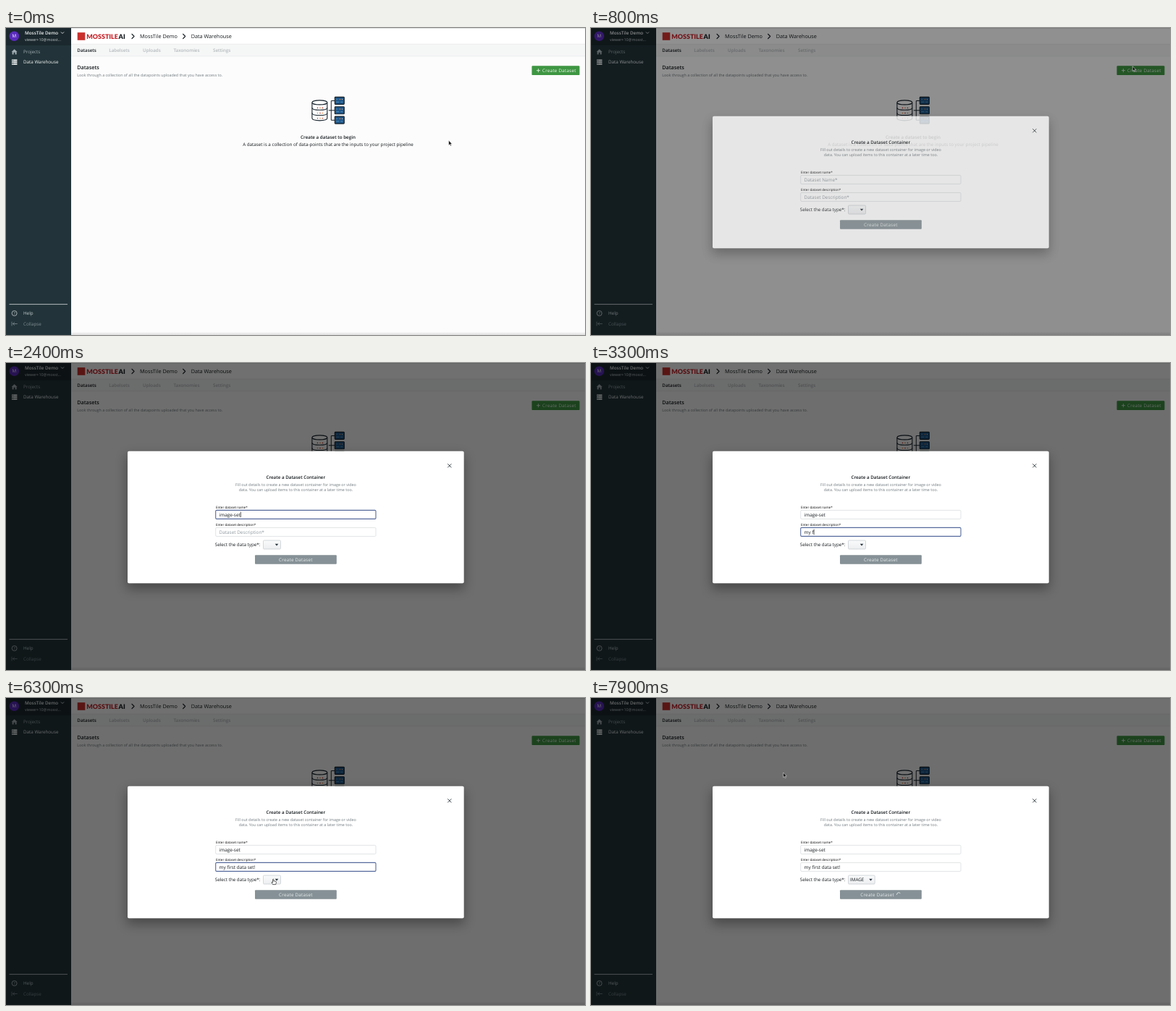
Write an HTML page that moves like this. It is 800 px wide and 424 px high and loops after 8000 ms.

```html
<!DOCTYPE html>
<html lang="en">
<head>
<meta charset="utf-8">
<title>Create a dataset</title>
<style>
  html, body { margin: 0; width: 100%; height: 100%; overflow: hidden; background: #fcfcfc; }
  svg { display: block; width: 800px; height: 424px; font-family: "Open Sans", "Noto Sans", sans-serif; }
  text { font-size: 6.27px; fill: #14191c; text-rendering: geometricPrecision; white-space: pre; }
  .semi { font-weight: 600; }
  .mid { text-anchor: middle; }
  .big { font-size: 7.25px; }
  .small { font-size: 5.38px; }
  .tiny { font-size: 4.5px; fill: #000; }
  .field { font-size: 6.4px; }
  .btn { letter-spacing: .25px; }
  .gray { fill: #70797e; }
  .tab { font-weight: 600; fill: #b4b9bc; }
  .hint { fill: #8f989e; }
  .line { fill: none; stroke-linecap: round; stroke-linejoin: round; }
  .box { fill: #fff; stroke: #d5d9dc; stroke-width: .7; }
  .box.on { stroke: #566a9c; stroke-width: 1.1; }
</style>
</head>
<body>
<svg viewBox="0 0 800 424">
  <defs>
    <linearGradient id="edge" x2="0" y2="1">
      <stop stop-color="#fcfcfc"/><stop offset="1" stop-color="#dcdcdc"/>
    </linearGradient>
    <linearGradient id="face" x2="0" y2="1">
      <stop stop-color="#fafbfb"/><stop offset="1" stop-color="#eceef0"/>
    </linearGradient>
    <filter id="soft" x="-20%" y="-30%" width="140%" height="170%"><feGaussianBlur stdDeviation="8"/></filter>
    <g id="server">
      <rect width="13" height="10" rx=".8" fill="#1f5688" stroke="#16222b" stroke-width="1.1"/>
      <path d="M2 3.2h2M2 6.8h4M8 6.8h3" stroke="#5fa0cb" stroke-width=".8"/>
      <path d="M6 3.2h2.5" stroke="#e9873c" stroke-width=".8"/>
      <circle cx="10.3" cy="3.2" r=".6" fill="#d8eaf4"/>
    </g>
    <g id="arrow"><path d="M0 0V6.6L1.5 5.3L2.5 7.6L3.6 7.1L2.6 4.9H4.6Z" fill="#0b0b0b" stroke="#fff" stroke-width=".5"/></g>
    <g id="hand"><path d="M-.7 .5Q0 -.4 .6 .5V3L1.6 2.8L2.6 3.1L3.8 3.5Q4.3 4 4 5.4L3.4 7.6H-.6L-2.3 4.8Q-2.2 3.8 -1.4 4.3L-.7 5Z" fill="#fff" stroke="#111" stroke-width=".65"/></g>
    <g id="beam"><path class="line" d="M-1.2 -3.5Q0 -3.5 0 -2.6V2.6Q0 3.5 -1.2 3.5M1.2 -3.5Q0 -3.5 0 -2.6M0 2.6Q0 3.5 1.2 3.5" stroke="#222" stroke-width=".6"/></g>
  </defs>

  <!-- page -->
  <rect width="800" height="424" fill="#fcfcfc"/>
  <rect x="90" width="710" height="22" fill="#fff"/>
  <rect x="90" width="710" height=".8" fill="#d6d8d9"/>
  <rect x="90" y="22" width="710" height="17" fill="#f5f6f6"/>
  <path d="M90 22.2H800M90 39H800" stroke="#e4e6e8" stroke-width=".6"/>
  <rect x="90" y="419.5" width="710" height="4.5" fill="url(#edge)"/>

  <rect x="98.7" y="6.2" width="10.6" height="10.6" fill="#c9302c"/>
  <text x="111.3" y="14.6" style="font:900 8.9px Lato,sans-serif;fill:#c9242b">MOSSTILE</text>
  <text x="155.6" y="14.6" style="font:900 8.9px Lato,sans-serif">AI</text>
  <path class="line" d="M174 8.4l3 3.1l-3 3.1M244.6 8.4l3 3.1l-3 3.1" stroke="#1b2327" stroke-width="1.3"/>
  <text class="big" x="185" y="14">MossTile Demo</text>
  <text class="big" x="255.7" y="14">Data Warehouse</text>

  <text class="semi" x="98.3" y="33">Datasets</text>
  <text class="tab" x="142.3" y="33">Labelsets</text>
  <text class="tab" x="189" y="33">Uploads</text>
  <text class="tab" x="231.5" y="33">Taxonomies</text>
  <text class="tab" x="286" y="33">Settings</text>

  <text class="big semi" x="98.2" y="56.6">Datasets</text>
  <text class="small gray" x="98.2" y="66.8">Look through a collection of all the datapoints uploaded that you have access to.</text>
  <rect x="726.5" y="52.3" width="66" height="12.8" rx="1.2" fill="#3e9642"/>
  <path d="M733 58.7h5M735.5 56.2v5" stroke="#eef7ee" stroke-width=".8"/>
  <text class="btn" x="741" y="61" style="fill:#eef7ee">Create Dataset</text>

  <g stroke="#16222b" stroke-width="1.1" fill="#fff">
    <path d="M422.9 102.9V124.6C422.9 128.9 443.8 128.9 443.8 124.6V102.9"/>
    <ellipse cx="433.35" cy="102.9" rx="10.45" ry="3"/>
    <path fill="none" d="M422.9 110.2C422.9 114.3 443.8 114.3 443.8 110.2M422.9 117.4C422.9 121.6 443.8 121.6 443.8 117.4"/>
    <path fill="none" d="M445.8 113.8H454M454 100.5H449.3V127.3H454" stroke-width="1"/>
  </g>
  <g id="lights"></g>
  <use href="#server" x="454.3" y="95.4"/>
  <use href="#server" x="454.3" y="108.8"/>
  <use href="#server" x="454.3" y="122.1"/>
  <text class="semi mid" x="445" y="152.6">Create a dataset to begin</text>
  <text class="mid" x="445" y="163.2">A dataset is a collection of data-points that are the inputs to your project pipeline</text>

  <!-- sidebar -->
  <rect width="90" height="424" fill="#223439"/>
  <rect width="90" height="24" fill="#1b282d"/>
  <circle cx="11.3" cy="11.2" r="6.8" fill="#5a2bbd"/>
  <text class="mid" x="11.3" y="13.4" style="fill:#fff">M</text>
  <text class="semi" x="26" y="9.1" style="fill:#f4f6f7">MossTile Demo</text>
  <path class="line" d="M76.2 5.8l1.8 1.8l1.8 -1.8" stroke="#dfe4e6" stroke-width=".9"/>
  <text class="small" x="26" y="18.3" style="fill:#c6cdd1">viewer+10@mosst...</text>
  <path d="M7.6 33L11.6 29.2L15.6 33H14.6V36.4H12.6V33.8H10.6V36.4H8.6V33Z" fill="#a3aeb4"/>
  <text x="24" y="35.3" style="fill:#a3aeb4">Projects</text>
  <path d="M8 43.6h7.4v1.9H8zM8 46.2h7.4v1.9H8zM8 48.8h7.4v1.9H8z" fill="#f0f3f4"/>
  <path d="M9 44.5h1M9 47.1h1M9 49.7h1" stroke="#223439" stroke-width=".7"/>
  <text x="24" y="49.3" style="fill:#f4f6f7">Data Warehouse</text>
  <path d="M4.5 381.6H85" stroke="#d5dadd" stroke-width=".8"/>
  <circle cx="11.6" cy="394" r="3.5" fill="none" stroke="#c4ccd0" stroke-width=".8"/>
  <text class="mid small" x="11.6" y="396" style="fill:#c4ccd0">?</text>
  <text x="24" y="396.4" style="fill:#c4ccd0">Help</text>
  <path class="line" d="M8 406v5M15.4 408.5H9.6M11.6 406.6l-2 1.9l2 1.9" stroke="#7f8c93" stroke-width=".8"/>
  <text x="24" y="411" style="fill:#7f8c93">Collapse</text>

  <!-- dialog -->
  <rect id="shade" width="800" height="424" fill-opacity=".56"/>
  <g id="dialog">
    <rect x="167" y="128" width="466" height="184" opacity=".34" filter="url(#soft)"/>
    <rect x="168" y="121.8" width="464.7" height="182.4" rx="2" fill="#fff"/>
    <path class="line" d="M610.5 139.5l4.6 4.6M615.1 139.5l-4.6 4.6" stroke="#2b363c" stroke-width=".9"/>
    <text class="semi mid" x="400.3" y="159.7">Create a Dataset Container</text>
    <text class="small gray mid" x="400.4" y="169.8">Fill out details to create a new dataset container for image or video</text>
    <text class="small gray mid" x="400.4" y="177.2">data. You can upload items to this container at a later time too.</text>
    <text class="tiny" x="290" y="200.8">Enter dataset name*</text>
    <rect class="box" x="289.7" y="203.4" width="221.3" height="12" rx="1.3"/>
    <text class="field" x="294.6" y="211.5"></text>
    <text class="tiny" x="290" y="224.9">Enter dataset description*</text>
    <rect class="box" x="289.7" y="227.4" width="221.3" height="12" rx="1.3"/>
    <text class="field" x="294.6" y="235.6"></text>
    <rect id="caret" width=".7" height="7.6" fill="#111"/>
    <text x="288.8" y="253.2">Select the data type*:</text>
    <rect id="select" x="355.5" y="245" width="24" height="12" rx="1.2" fill="url(#face)" stroke="#c3c9cd" stroke-width=".7"/>
    <text id="kind" x="358" y="253.2"></text>
    <path id="drop" d="M-2.3 -1.2H2.3L0 1.4Z" fill="#26323a"/>
    <rect x="344" y="265.2" width="112.8" height="12.6" rx="1" fill="#859196"/>
    <text id="submit" class="btn mid" y="273.8" style="fill:#e8ecee">Create Dataset</text>
    <path id="spin" class="line" d="M-2.7 0A2.7 2.7 0 0 1 1.9 -1.9" stroke="#f1f4f5" stroke-width=".8"/>
  </g>
  <use id="pointer"/>
</svg>
<script>
const LOOP = 8000, STEP = 100;
const $ = id => document.getElementById(id);
const set = (el, attrs) => { for (const k in attrs) el.setAttribute(k, attrs[k]); };
const show = (el, on) => { el.style.display = on ? "" : "none"; };

$("lights").innerHTML = [109.2, 116.4, 123.6].map((y, row) =>
  [430.5, 434, 437.5].map((x, i) =>
    `<circle cx="${x}" cy="${y + 1.2}" r=".8" fill="${(row + i) % 2 ? "#e8893f" : "#c33a34"}"/>`).join("")).join("");

// time, number of typed letters
const inputs = [
  { text: "image-set", hint: "Dataset Name*", from: 1600, to: 2800,
    keys: [[1700, 1], [1800, 2], [1900, 3], [2000, 4], [2100, 5], [2200, 7], [2400, 9]] },
  { text: "my first data set!", hint: "Dataset Description*", from: 2800, to: 6500,
    keys: [[2900, 1], [3100, 2], [3200, 3], [3300, 4], [3500, 5], [3600, 6], [3700, 7], [3800, 8],
      [4000, 9], [4100, 10], [4200, 11], [4300, 12], [4400, 13], [4700, 14], [4800, 15], [4900, 16],
      [5400, 17], [5500, 18]] }
];
const boxes = document.querySelectorAll(".box");
const values = document.querySelectorAll(".field");

// time, x, y
const path = [[0, 611.7, 155.3], [100, 614, 153], [400, 690, 92], [700, 747.5, 54], [800, 748.3, 52.8],
  [900, 539, 133.3], [1000, 462, 172], [1200, 386, 209], [1600, 380, 210],
  [5900, 408, 226], [6200, 371, 249], [6300, 369.3, 250], [6700, 369, 251],
  [7100, 398, 269], [7700, 404, 271], [7900, 265.7, 103]];
// time, pointer shape
const shapes = [[0, "arrow"], [1200, "beam"], [1600, ""],
  [5900, "arrow"], [6200, "hand"], [6700, "arrow"], [7000, "hand"], [7500, "arrow"]];

const latest = (table, t, start) => table.reduce((v, [at, x]) => at <= t ? x : v, start);

function along(t) {
  const i = path.findIndex(p => p[0] > t);
  if (i < 0) return path[path.length - 1].slice(1);
  const [a, b] = [path[i - 1], path[i]];
  const f = (t - a[0]) / (b[0] - a[0]);
  return [1, 2].map(k => a[k] + (b[k] - a[k]) * f);
}

function draw(t) {
  const fade = latest([[800, .78], [900, 1]], t, 0);
  $("shade").style.opacity = fade;
  $("dialog").style.opacity = fade;

  show($("caret"), false);
  inputs.forEach((input, i) => {
    const typed = input.text.slice(0, latest(input.keys, t, 0));
    const focused = t >= input.from && t < input.to;
    const value = values[i];
    value.textContent = typed || input.hint;
    value.classList.toggle("hint", !typed);
    boxes[i].classList.toggle("on", focused);
    if (focused && t < 5900) {
      const width = typed ? value.getComputedTextLength() : 0;
      set($("caret"), { x: 294.7 + width, y: 205.5 + 24.1 * i });
      show($("caret"), true);
    }
  });

  const chosen = t >= 6700, busy = t >= 7500;
  $("kind").textContent = chosen ? "IMAGE" : "";
  set($("select"), { width: chosen ? 36.7 : 24 });
  set($("drop"), { transform: `translate(${chosen ? 386.5 : 374} 251)` });
  set($("submit"), { x: busy ? 395.6 : 400.4 });
  show($("spin"), busy);
  set($("spin"), { transform: `translate(425.2 271.4) rotate(${(t - 7900) * .72})` });

  const shape = latest(shapes, t, "");
  show($("pointer"), shape);
  const [x, y] = along(t);
  set($("pointer"), { href: "#" + shape, transform: `translate(${x} ${y})` });
}

function tick() {
  draw(Math.floor(performance.now() % LOOP / STEP) * STEP);
  requestAnimationFrame(tick);
}
tick();
</script>
</body>
</html>
```
